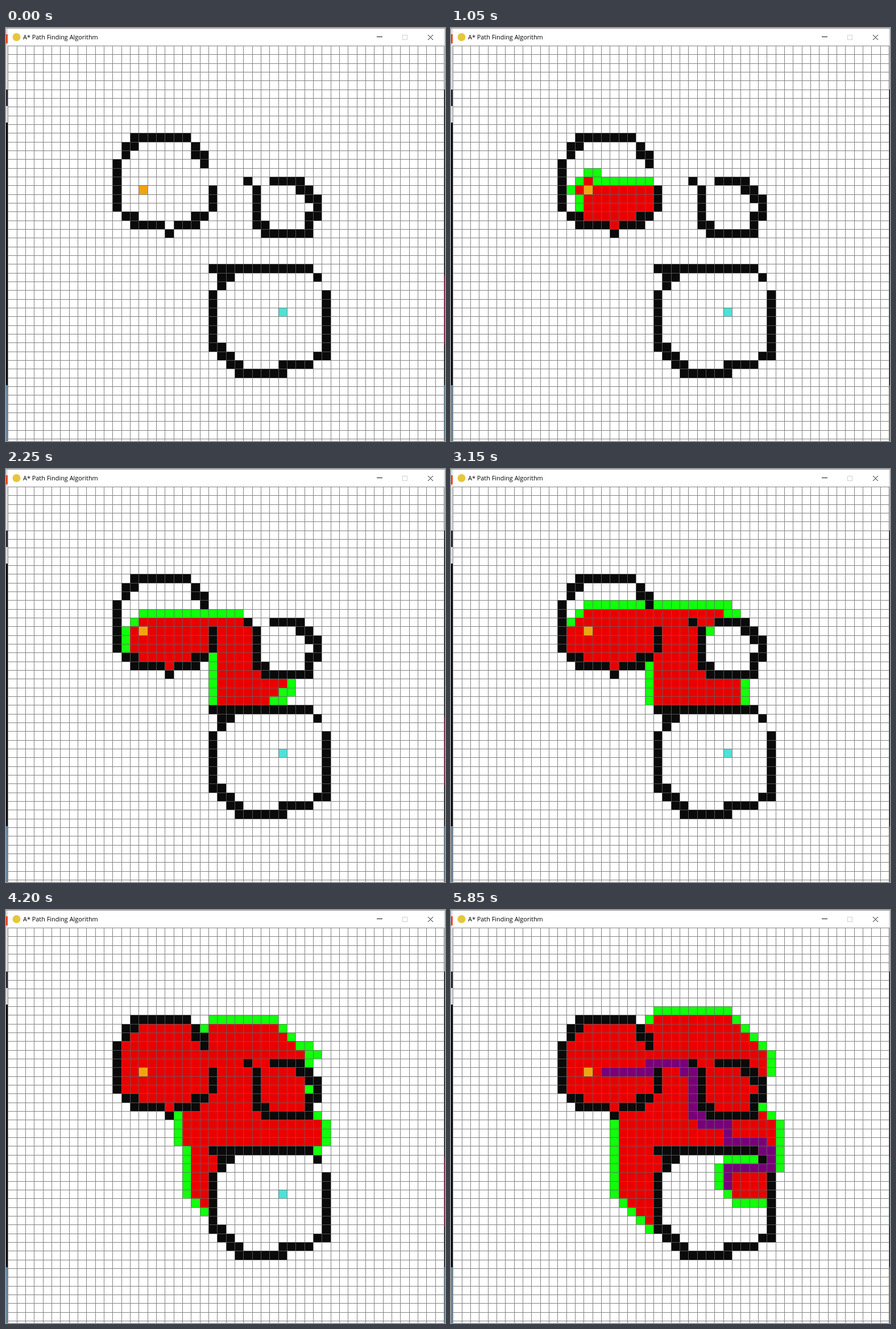
Write an HTML page with a canvas that moves like this. It is 772 px wide and 725 px high and loops after 6000 ms.

```html
<!DOCTYPE html>
<html lang="en">
<head>
<meta charset="utf-8">
<title>A* Path Finding Algorithm</title>
<style>
  html, body { margin: 0; width: 100%; height: 100%; overflow: hidden; background: #fff; }
  canvas { position: absolute; left: 0; top: 0; display: block; }
  .title {
    position: absolute; left: 30px; top: 8px;
    font: 10.9px/16px "Open Sans", "Noto Sans", sans-serif; color: #000; white-space: nowrap;
  }
</style>
</head>
<body>
<canvas id="stage" width="772" height="725"></canvas>
<div class="title">A* Path Finding Algorithm</div>
<script>
const ctx = document.getElementById('stage').getContext('2d');
const SIZE = 50, GAP = 46 / 3, LOOP = 6000, TICK = 150;
const COLORS = {
  wall: '#0a0a0a', start: '#f0a412', end: '#4de2d6',
  open: '#12ff0c', closed: '#e90000', path: '#780078'
};

const id = (c, r) => r * SIZE + c;
const col = n => n % SIZE;
const row = n => Math.floor(n / SIZE);
const start = id(15, 16), end = id(31, 30);

// Walls are pen strokes: a first cell, then compass moves with optional lengths.
const STROKES = [
  [22, 13, 'n w n nw w6 s w s sw s5 se e s e3 se ne e2 n e ne n2'],
  [27, 15, 'se s4 e s e5 n2 e n2 w n w n w3'],
  [36, 28, 's7 w sw w3 s w5 n w n w n w n6 ne n e nw w e11 se']
];

function drawStroke(grid, [c, r, moves]) {
  grid[id(c, r)] = 'wall';
  for (const move of moves.split(' ')) {
    const [, dir, count] = move.match(/([a-z]+)(\d*)/);
    for (let i = 0; i < (+count || 1); i++) {
      c += dir.includes('e') - dir.includes('w');
      r += dir.includes('s') - dir.includes('n');
      grid[id(c, r)] = 'wall';
    }
  }
}

function buildGrid() {
  const grid = new Array(SIZE * SIZE).fill('');
  STROKES.forEach(s => drawStroke(grid, s));
  grid[start] = 'start';
  grid[end] = 'end';
  return grid;
}

// Runs A* and keeps the board as it looks after every step.
function solve() {
  const grid = buildGrid(), steps = [grid.slice()];
  const save = () => steps.push(grid.slice());
  const dist = n => Math.abs(col(n) - col(end)) + Math.abs(row(n) - row(end));
  const neighbors = n => [n + 1, n - 1, n + SIZE, n - SIZE].filter(m => grid[m] !== 'wall');

  const cost = new Array(SIZE * SIZE).fill(Infinity), from = new Map();
  let open = [{ f: dist(start), order: 0, n: start }], order = 0;
  cost[start] = 0;

  while (open.length) {
    const best = open.reduce((a, b) => b.f < a.f || (b.f === a.f && b.order < a.order) ? b : a);
    open = open.filter(o => o !== best);
    let n = best.n;
    if (n === end) {
      while (from.has(n)) {
        n = from.get(n);
        grid[n] = 'path';
        save();
      }
      break;
    }
    for (const m of neighbors(n)) {
      const g = cost[n] + 1;
      if (g >= cost[m]) continue;
      cost[m] = g;
      from.set(m, n);
      if (!open.some(o => o.n === m)) {
        open.push({ f: g + dist(m), order: ++order, n: m });
        grid[m] = 'open';
      }
    }
    save();
    if (n !== start) grid[n] = 'closed';
  }
  return steps;
}

const steps = solve();

// Key times in ms and the step reached by then; the speed is even in between.
const PACE = [[300, 0], [1050, 34], [2250, 93], [3150, 127],
              [4200, 242], [4800, 301], [5850, steps.length - 3]];

function stepAt(t) {
  const i = PACE.findIndex(p => p[0] > t);
  if (i === 0) return 0;
  if (i < 0) return steps.length - 3;
  const [t0, s0] = PACE[i - 1], [t1, s1] = PACE[i];
  return Math.round(s0 + (s1 - s0) * (t - t0) / (t1 - t0));
}

const px = c => Math.round(3.33 + c * GAP);
const py = r => Math.round(31 + r * GAP);

function rect(color, x, y, w, h) {
  ctx.fillStyle = color;
  ctx.fillRect(x, y, w, h);
}

function line(color, x1, y1, x2, y2) {
  ctx.strokeStyle = color;
  ctx.beginPath();
  ctx.moveTo(x1, y1);
  ctx.lineTo(x2, y2);
  ctx.stroke();
}

function drawWindow() {
  // Slivers of the desktop on both sides
  rect('#dedede', 0, 0, 772, 166);
  rect('#e8481f', 0, 11, 3, 16);
  rect('#2d2b38', 0, 108, 3, 29);
  rect('#0b0b0b', 0, 166, 3, 461);
  rect('#64879c', 0, 627, 772, 98);
  rect('#17171c', 770, 108, 2, 519);
  rect('#8a1236', 770, 435, 2, 120);

  rect('#8c8c8c', 0, 0, 772, 1);
  rect('#fff', 3, 1, 767, 30);

  ctx.fillStyle = '#e6c63c';
  ctx.beginPath();
  ctx.arc(18.5, 16, 7, 0, 7);
  ctx.fill();

  line('#111', 652, 15.5, 662, 15.5);
  ctx.strokeStyle = '#d0d0d0';
  ctx.strokeRect(697.5, 12.5, 8, 8);
  line('#111', 742, 12, 751, 21);
  line('#111', 751, 12, 742, 21);
}

function drawBoard(grid) {
  rect('#fff', 3, 31, 767, 694);
  grid.forEach((kind, n) => {
    if (!kind) return;
    const c = col(n), r = row(n), x = px(c), y = py(r);
    rect(COLORS[kind], x, y, px(c + 1) - x, py(r + 1) - y);
  });
  // One path, so that crossings are not tinted twice
  ctx.fillStyle = 'rgba(101, 101, 101, .8)';
  ctx.beginPath();
  for (let i = 0; i <= SIZE; i++) {
    ctx.rect(px(i), 31, 1, 694);
    ctx.rect(3, py(i), 767, 1);
  }
  ctx.fill();
}

drawWindow();
let shown = -1;
function frame() {
  const t = performance.now() % LOOP;
  const s = stepAt(Math.floor(t / TICK) * TICK);
  if (s !== shown) drawBoard(steps[shown = s]);
  requestAnimationFrame(frame);
}
frame();
</script>
</body>
</html>
```
